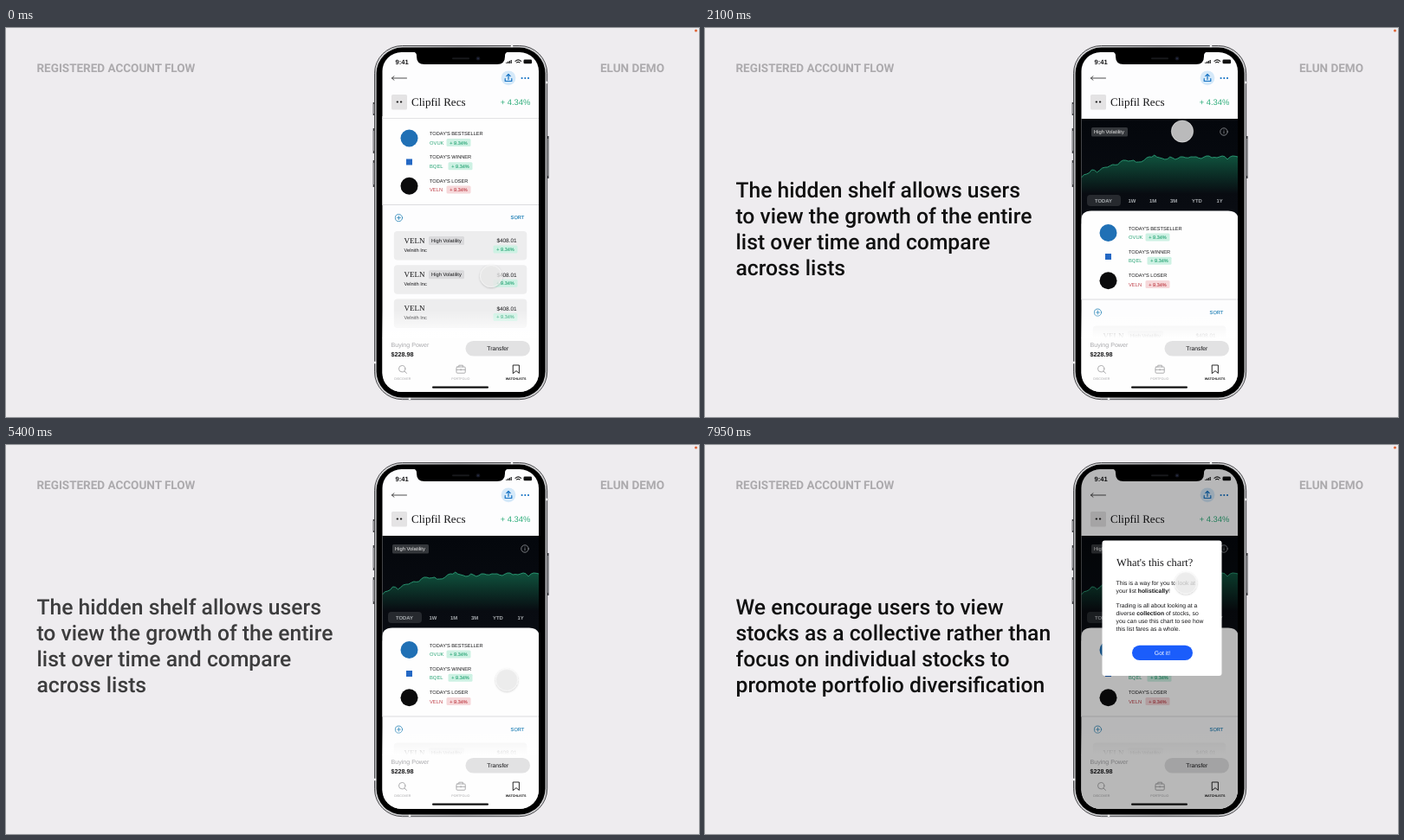
An HTML page that plays this animation: 800 px wide and 450 px high, repeating every 8 s.

```html
<!DOCTYPE html>
<html lang="en">
<head>
<meta charset="utf-8">
<title>Registered account flow</title>
<style>
  html, body { margin: 0; width: 100%; height: 100%; overflow: hidden; background: #eeecef; }
  svg { display: block; width: 100vw; height: 100vh; }
  text { font-family: "Liberation Sans", Arial, sans-serif; text-rendering: geometricPrecision; fill: #161618; }
  .serif { font-family: "Liberation Serif", serif; }
  .heading { font: 700 13.5px Roboto, sans-serif; fill: #acaaad; }
  .caption { font: 500 24.7px Roboto, sans-serif; fill: #111; }
  .mid { text-anchor: middle; }
  .end { text-anchor: end; }
  .bold { font-weight: 700; }
  .tab { font-size: 5.9px; font-weight: 700; fill: #a9adb1; text-anchor: middle; }
  .nav { font-size: 3.7px; fill: #a5a5a8; text-anchor: middle; }
  .line { fill: none; stroke-linecap: round; stroke-linejoin: round; }
</style>
</head>
<body>
<svg viewBox="0 0 800 450">
  <defs>
    <clipPath id="screenClip"><rect x="434.5" y="28" width="180.5" height="393" rx="22"/></clipPath>
    <linearGradient id="metal">
      <stop offset="0" stop-color="#77777a"/><stop offset=".008" stop-color="#d6d6d8"/>
      <stop offset=".5" stop-color="#a9a9ac"/><stop offset=".992" stop-color="#d6d6d8"/><stop offset="1" stop-color="#77777a"/>
    </linearGradient>
    <linearGradient id="night" x2="0" y2="1">
      <stop offset="0" stop-color="#04070c"/><stop offset="1" stop-color="#0a0d13"/>
    </linearGradient>
    <linearGradient id="area" gradientUnits="userSpaceOnUse" x1="0" y1="146" x2="0" y2="192">
      <stop offset="0" stop-color="#10553f"/><stop offset="1" stop-color="#10553f" stop-opacity="0"/>
    </linearGradient>
    <linearGradient id="fade" x2="0" y2="1">
      <stop offset="0" stop-color="#fff" stop-opacity="0"/><stop offset="1" stop-color="#fff"/>
    </linearGradient>
    <filter id="shadow" x="-40%" y="-40%" width="180%" height="180%">
      <feDropShadow dx="0" dy=".8" stdDeviation="1.2" flood-opacity=".28"/>
    </filter>
  </defs>

  <rect width="800" height="450" fill="#eeecef"/>
  <circle cx="796.5" cy="3" r="1.6" fill="#e0693c"/>
  <text class="heading" x="35.5" y="50.7">REGISTERED ACCOUNT FLOW</text>
  <text class="heading end" x="760" y="50.7">ELUN DEMO</text>
  <g id="captionA"></g>
  <g id="captionB"></g>

  <!-- Phone body -->
  <g fill="none" stroke-width="1.8">
    <path d="M424.6 86v15M424.6 116v29M424.6 153v31M625.7 125v49" stroke="#3c3c3f"/>
    <path d="M424.6 88v11M424.6 119v23M424.6 156v25M625.7 128v43" stroke="#98989b"/>
  </g>
  <rect x="425.5" y="20.5" width="199.2" height="409.2" rx="32" fill="url(#metal)" stroke="#4d4d50"/>
  <path d="M425 387h3M622 63h3M466 427v3M584 20v3" stroke="#f4f4f5" stroke-width="2.4"/>
  <rect x="427.6" y="22.6" width="195" height="405" rx="30" fill="#000"/>

  <g clip-path="url(#screenClip)">
    <rect x="434" y="28" width="182" height="394" fill="#fdfdfe"/>

    <g id="chart">
      <rect x="434" y="105" width="182" height="121.5" fill="url(#night)"/>
      <path id="chartArea" fill="url(#area)"/>
      <path id="chartLine" class="line" stroke="#2c9f78" stroke-width=".9"/>
      <rect x="446" y="115" width="42" height="10.6" rx="1.5" fill="#34373b"/>
      <text x="449" y="122.3" font-size="5.8" style="fill:#eee">High Volatility</text>
      <g class="line" stroke="#a8abaf" stroke-width=".7"><circle cx="599" cy="120" r="4.2"/><path d="M599 119.6v2.2M599 118v.1"/></g>
      <rect x="441" y="193" width="39" height="13" rx="4" fill="#26292e"/>
    </g>

    <g id="sheet">
      <path id="card" fill="#fefefe"/>
      <path d="M434 204.5h182" stroke="#dcdcdf" stroke-width="1.2"/>
      <g id="rows"></g>
      <g class="line" stroke="#2482b5" stroke-width=".8"><circle cx="453.5" cy="219.6" r="4.1"/><path d="M451.5 219.6h4M453.5 217.6v4"/></g>
      <text class="end" x="598.3" y="221.3" font-size="5.7" style="fill:#1b7db4" stroke="#1b7db4" stroke-width=".15">SORT</text>
      <g id="cards"></g>
    </g>

    <!-- Top bar -->
    <path id="topLine" d="M434 104.5h182" stroke="#e2e2e5"/>
    <text class="bold" x="449.5" y="41.6" font-size="7.6">9:41</text>
    <path d="M577.8 41v-1.3M579.6 41v-2.2M581.4 41v-3.1M583.2 41v-4" stroke="#111" stroke-width="1.2"/>
    <path d="M588 38.3q3.3-2.8 6.6 0M589.6 40q1.7-1.4 3.4 0" class="line" stroke="#111" stroke-width="1.1"/>
    <rect x="597.5" y="36.5" width="9.6" height="4.8" rx="1.4" fill="#111"/>
    <path d="M462.5 58h-17M448 55.8l-2.6 2.2 2.6 2.2" class="line" stroke="#222" stroke-width=".8"/>
    <circle cx="580" cy="57.8" r="8.4" fill="#d5e9f9"/>
    <path d="M576.2 58.5v3h7.6v-3M580 59.6v-5.8M577.8 55.7l2.2-2.2 2.2 2.2" class="line" stroke="#1673c4" stroke-width="1.2"/>
    <path d="M595.6 58h.01M599.3 58h.01M603 58h.01" class="line" stroke="#1673c4" stroke-width="2.2"/>
    <rect x="445" y="77" width="18" height="17.5" rx="1.5" fill="#e4e3e4"/>
    <path d="M451.6 85.6h.5M455.8 85.6h.5" class="line" stroke="#222" stroke-width="2"/>
    <text class="serif" x="468" y="90.2" font-size="13">Clipfil Recs</text>
    <text class="end" x="605.3" y="89.2" font-size="9.4" style="fill:#2fad7b">+ 4.34%</text>

    <!-- Bottom bar -->
    <rect x="434" y="326" width="182" height="33" fill="url(#fade)"/>
    <rect x="434" y="358.8" width="182" height="64" fill="#fefefe"/>
    <text x="444.5" y="368.6" font-size="7.1" style="fill:#a9a9ac">Buying Power</text>
    <text class="bold" x="444.5" y="379.6" font-size="7.2">$228.98</text>
    <rect x="530.5" y="362" width="74.5" height="17.6" rx="8.8" fill="#e2e2e3"/>
    <text class="mid" x="567.8" y="373.2" font-size="6.8">Transfer</text>
    <g class="line" stroke="#a5a5a8" stroke-width=".9">
      <circle cx="457.2" cy="394.2" r="3.7"/><path d="M460 397l2.5 2.4"/>
      <rect x="520" y="392" width="10.2" height="7.2" rx="1"/><path d="M522.8 392v-1.8h4.6v1.8M520 395.3h10.2M525.1 394.6v1.4"/>
      <path d="M585.6 390h6.8v9.4l-3.4-2.8-3.4 2.8z" stroke="#111"/>
    </g>
    <text class="nav" x="457.8" y="406.6">DISCOVER</text>
    <text class="nav" x="524.8" y="406.6">PORTFOLIO</text>
    <text class="nav bold" x="588.6" y="406.6" style="fill:#111">WATCHLISTS</text>
    <rect x="492" y="414.6" width="65" height="2.2" rx="1.1" fill="#111"/>

    <rect id="dim" x="434" y="28" width="182" height="394"/>
    <g id="modal">
      <rect x="458.5" y="110.5" width="138" height="156.5" rx="3" fill="#fff"/>
      <text class="serif" x="475" y="140" font-size="12.4">What's this chart?</text>
      <g id="modalText" font-size="6.8"></g>
      <rect x="493" y="231.7" width="70" height="17.4" rx="8.7" fill="#1b5dfb"/>
      <text class="mid" x="528" y="242.8" font-size="6.9" style="fill:#fff">Got it!</text>
    </g>
  </g>

  <path d="M470 27.5q4 .5 4 4.5v1q0 9 9 9h84q9 0 9-9v-1q0-4 4-4.5z" fill="#000"/>
  <path d="M516 35.3h18" class="line" stroke="#17181b" stroke-width="2"/>
  <circle cx="545" cy="35.3" r="2.3" fill="#14161f"/><circle cx="545" cy="35.3" r=".9" fill="#2c3350"/>

  <g id="cursor" filter="url(#shadow)">
    <circle r="12.6" fill="#eee" fill-opacity=".75" stroke="#fff" stroke-opacity=".55" stroke-width=".9"/>
  </g>
</svg>

<script>
const LOOP = 8000, SHELF = 109.5;
const el = id => document.getElementById(id);
const fill = (id, markup) => { el(id).innerHTML = markup; };
const lines = (rows, x, y, step, cls = '') =>
  rows.map((row, i) => `<text class="${cls}" x="${x}" y="${y + i * step}">${row}</text>`).join('');

const GAIN = { ink: '#2ba677', back: '#cdf1e3' }, LOSS = { ink: '#c0444d', back: '#f6d8da' };
const badge = (x, y, tone) => `
  <rect x="${x}" y="${y}" width="28" height="9" rx="1.5" fill="${tone.back}"/>
  <text class="mid" x="${x + 14}" y="${y + 6.5}" font-size="5.5" style="fill:${tone.ink}" stroke="${tone.ink}" stroke-width=".12">+ 9.34%</text>`;

const row = (y, title, ticker, badgeX, tone, mark) => `${mark}
  <text x="489" y="${y + 2}" font-size="5.65">${title}</text>
  <text x="489" y="${y + 12.6}" font-size="5.8" style="fill:${tone.ink}">${ticker}</text>
  ${badge(badgeX, y + 6, tone)}`;

const stockCard = (y, volatile) => `
  <rect x="447.8" y="${y}" width="153.5" height="33.5" rx="4" fill="#ededee"/>
  <text class="serif" x="459.5" y="${y + 14}" font-size="9">VELN</text>
  <text x="459.5" y="${y + 23.5}" font-size="5.7">Velnith Inc</text>
  ${volatile ? `<rect x="488" y="${y + 6}" width="41" height="10" rx="1.5" fill="#dadadc"/>
  <text x="491" y="${y + 13}" font-size="5.8">High Volatility</text>` : ''}
  <text class="end" x="589.5" y="${y + 13.3}" font-size="6.4">$408.01</text>
  ${badge(562.5, y + 16.5, GAIN)}`;

fill('captionA', lines(['The hidden shelf allows users', 'to view the growth of the entire',
  'list over time and compare', 'across lists'], 35.5, 196, 30, 'caption'));
fill('captionB', lines(['We encourage users to view', 'stocks as a collective rather than',
  'focus on individual stocks to', 'promote portfolio diversification'], 35.5, 196, 30, 'caption'));
fill('modalText',
  lines(['This is a way for you to look at', 'your list <tspan class="bold">holistically</tspan>!'], 474.5, 161.7, 9) +
  lines(['Trading is all about looking at a', 'diverse <tspan class="bold">collection</tspan> of stocks, so',
    'you can use this chart to see how', 'this list fares as a whole.'], 474.5, 187.8, 8.9));
fill('rows',
  row(122, "TODAY'S BESTSELLER", 'OVUK', 508.5, GAIN, '<circle cx="465.5" cy="127.5" r="10" fill="#2070b5"/>') +
  row(149.2, "TODAY'S WINNER", 'BQEL', 510.5, GAIN, '<rect x="462" y="151.5" width="7" height="7" fill="#2468c4"/>') +
  row(176.6, "TODAY'S LOSER", 'VELN', 508.5, LOSS, '<circle cx="465.5" cy="182.8" r="10" fill="#0b0b0c"/>'));
fill('cards', stockCard(235, true) + stockCard(274.2, true) + stockCard(313.4, false));
el('chart').insertAdjacentHTML('beforeend',
  [['TODAY', 460], ['1W', 493], ['1M', 517], ['3M', 541], ['YTD', 568], ['1Y', 594]]
    .map(([label, x]) => `<text class="tab" x="${x}" y="201.6">${label}</text>`).join(''));

// Evenly spaced heights with a small pseudo-random midpoint between each pair.
const trend = [173, 169, 164, 167, 162, 161, 158, 158, 153, 154, 153, 155, 153, 149, 147, 150,
  152, 149, 152, 149, 150, 149, 149, 151, 148, 150, 150, 148, 152, 148, 149];
const jitter = i => { const n = Math.sin(i * 12.9898) * 43758.5453; return (n - Math.floor(n) - .5) * 2.5; };
const curve = trend.flatMap((y, i) => {
  const x = 434.5 + i * 6.02, next = trend[i + 1] ?? y;
  return [`${x} ${y}`, `${x + 3.01} ${(y + next) / 2 + jitter(i)}`];
}).join('L');
el('chartLine').setAttribute('d', 'M' + curve);
el('chartArea').setAttribute('d', `M${curve}V194H434.5Z`);

const clamp = u => Math.min(1, Math.max(0, u));
const ramp = (t, from, to) => clamp((t - from) / (to - from));
const smooth = u => u * u * (3 - 2 * u);

// Cursor stops: time, x, y
const path = [
  [0, 560, 287], [900, 563, 235], [1160, 563, 235], [1700, 565, 344], [2050, 551, 119.5],
  [2500, 551, 119.5], [3300, 578, 236], [3700, 578, 236], [4250, 575, 127], [4500, 573, 201.5],
  [4575, 573, 201.5], [5115, 573, 311], [6100, 598, 118.5], [6500, 598, 118.5], [7400, 555, 159.5], [LOOP, 555, 159.5]
];
function cursorAt(t) {
  const i = path.findIndex(stop => stop[0] > t);
  const [t0, x0, y0] = path[i - 1], [t1, x1, y1] = path[i];
  const u = smooth(ramp(t, t0, t1));
  return [x0 + (x1 - x0) * u, y0 + (y1 - y0) * u];
}

function render(t) {
  const open = smooth(ramp(t, 1160, 1700)) - smooth(ramp(t, 3700, 4250)) + smooth(ramp(t, 4575, 5115));
  const popup = ramp(t, 6250, 6550);
  const r = 12 * clamp(open * 20);
  el('sheet').setAttribute('transform', `translate(0 ${open * SHELF})`);
  el('card').setAttribute('d', `M434 204.5V${102 + r}q0 ${-r} ${r} ${-r}H${616 - r}q${r} 0 ${r} ${r}V204.5z`);
  el('chart').setAttribute('opacity', open);
  el('topLine').setAttribute('opacity', 1 - open);
  el('dim').setAttribute('opacity', popup * .28);
  el('modal').setAttribute('opacity', popup);
  el('captionA').setAttribute('opacity', ramp(t, 100, 600) - ramp(t, 5300, 5800));
  el('captionB').setAttribute('opacity', ramp(t, 7000, 7500));
  el('cursor').setAttribute('transform', `translate(${cursorAt(t)})`);
}

function frame() {
  render(performance.now() % LOOP);
  requestAnimationFrame(frame);
}
frame();
</script>
</body>
</html>
```
